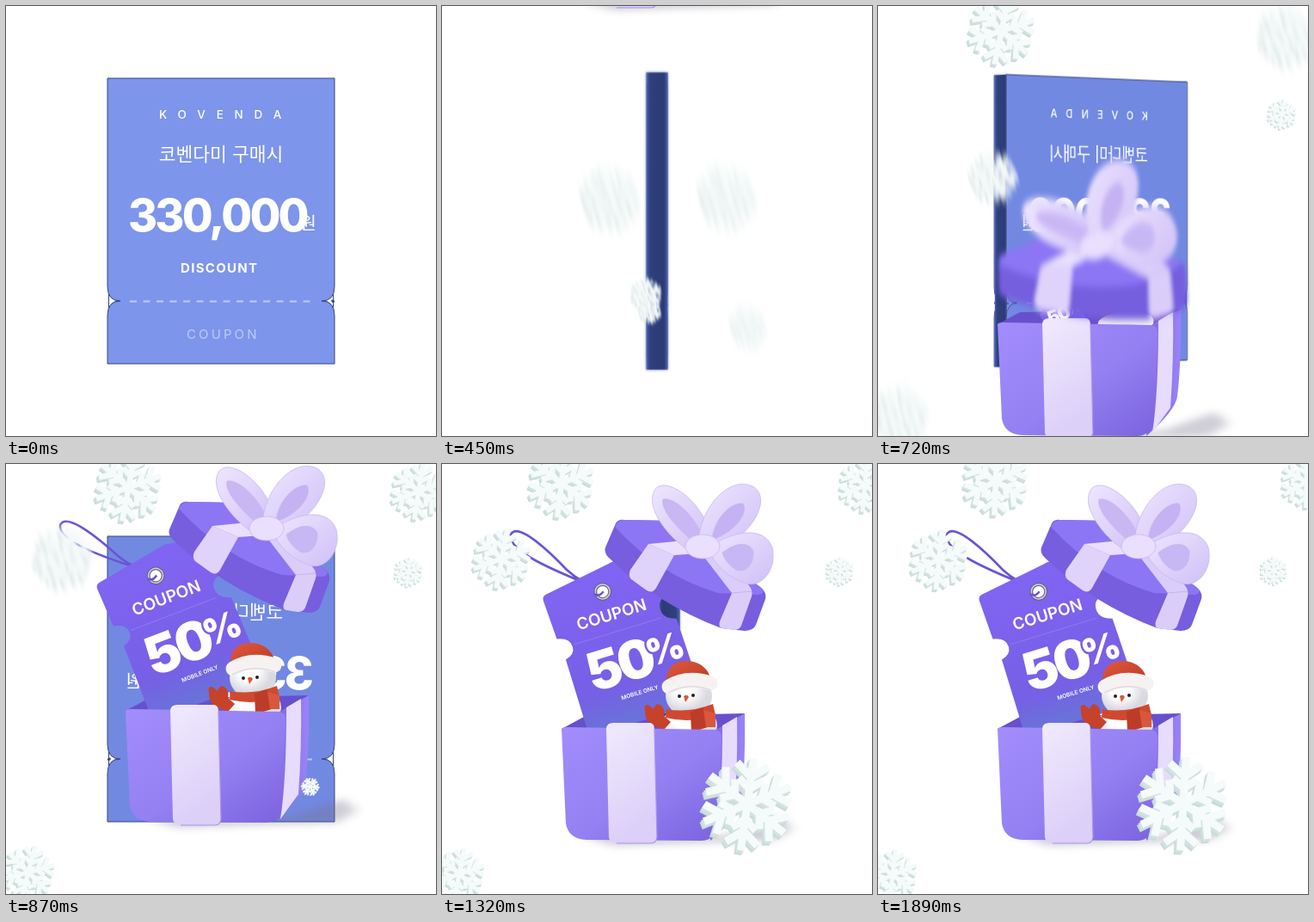
Animation, 500 px wide and 500 px high, one loop 1920 ms. Source, as an HTML page:

```html
<!DOCTYPE html>
<html lang="ko">
<head>
<meta charset="utf-8">
<title>Coupon gift box</title>
<style>
html, body { margin: 0; width: 100%; height: 100%; overflow: hidden; background: #fff; }
#stage { position: relative; width: 500px; height: 500px; overflow: hidden; perspective: 3000px; }
#scene { position: absolute; left: 0; top: 0; }
#card { position: absolute; left: 118px; top: 84px; width: 264px; height: 332px; transform-style: preserve-3d; }
#card > * { position: absolute; left: 0; top: 0; overflow: visible; }
#card .side { left: 120px; width: 24px; height: 332px; background: linear-gradient(90deg, #4c61ad, #2f407e 18%, #2c3b76 82%, #4c61ad); box-shadow: 0 0 3px #8796d8; }
text { font-family: Inter, "Open Sans", sans-serif; }
.ko { font-family: "Noto Sans CJK KR", "Noto Sans CJK", sans-serif; font-weight: 500; }
</style>
</head>
<body>
<div id="stage">
<div id="card"></div>
<svg id="scene" width="500" height="500" viewBox="0 0 500 500">
<defs>
  <linearGradient id="front" x2="1" y2="1">
    <stop stop-color="#a38dfd"/><stop offset=".55" stop-color="#9480f2"/><stop offset="1" stop-color="#7a62de"/>
  </linearGradient>
  <linearGradient id="flank" x2="1" y2="0">
    <stop stop-color="#7c65df"/><stop offset="1" stop-color="#9b83f8"/>
  </linearGradient>
  <linearGradient id="band" x2=".3" y2="1">
    <stop stop-color="#f0eafe"/><stop offset="1" stop-color="#dccff8"/>
  </linearGradient>
  <linearGradient id="loop" x2="1" y2="1">
    <stop stop-color="#eee6ff"/><stop offset="1" stop-color="#cfc0f7"/>
  </linearGradient>
  <linearGradient id="paper" x2="0" y2="1">
    <stop stop-color="#8065f2"/><stop offset=".75" stop-color="#775fe6"/><stop offset="1" stop-color="#6874d8"/>
  </linearGradient>
  <linearGradient id="hat" x2="1" y2="1">
    <stop stop-color="#e0593f"/><stop offset="1" stop-color="#b93822"/>
  </linearGradient>
  <radialGradient id="snow" cx=".4" cy=".35">
    <stop offset=".4" stop-color="#fff"/><stop offset="1" stop-color="#d9d9e0"/>
  </radialGradient>
  <filter id="soft" x="-50%" y="-100%" width="200%" height="300%"><feGaussianBlur stdDeviation="7 4"/></filter>
  <filter id="lidBlur" x="-20%" y="-20%" width="140%" height="140%"><feGaussianBlur stdDeviation="0"/></filter>
  <path id="arm" d="M0 0V-9.7M-3.3-8.3 0-5.6 3.3-8.3M-2.5-5.2 0-3.2 2.5-5.2" fill="none" stroke-width="1.6"/>
  <g id="arms"></g>
</defs>

<g id="box">
  <g id="boxBack">
    <path d="M160 432H330L392 410 408 424 385 438 200 444Z" fill="#777188" opacity=".35" filter="url(#soft)"/>
    <path d="M139 308 165 294 352 290 350 318 325 330H145Z" fill="#6750cd"/>
  </g>
  <g id="gifts">
    <g id="tag">
      <path d="M187 147C155 133 75 105 80 82 88 66 127 104 145 123 160 137 175 142 187 147" fill="none" stroke="#6b53d6" stroke-width="2.6"/>
      <g transform="translate(205 215) rotate(-17)">
        <path d="M-62-85 18-98Q24-100 30-98L66-92Q71-91 71-84V-43Q59-40 60-28 61-18 75-14L78 88H-62V-6Q-50-9-50-18-50-29-65-32L-67-79Q-67-84-62-85Z" fill="url(#paper)"/>
        <path d="M-48-20H58" stroke="#8e78f5"/>
        <circle cx="2" cy="-69" r="8.5" fill="#fff" stroke="#696685" stroke-width="4"/>
        <circle cx="2" cy="-69" r="8.5" fill="none" stroke="#d4d2df" stroke-width="1.5"/>
        <path d="M3-69Q-4-64-8-69" fill="none" stroke="#6b53d6" stroke-width="2.5"/>
        <g fill="#fff" text-anchor="middle">
          <text x="4" y="-34" font-size="19" font-weight="600">COUPON</text>
          <text x="-4" y="40" font-size="62" font-weight="900" letter-spacing="-4">50</text>
          <text x="52" y="31" font-size="43" font-weight="900" stroke="#7860e6" stroke-width="5" paint-order="stroke">%</text>
          <text x="9" y="58" font-size="6.6" font-weight="600">MOBILE ONLY</text>
        </g>
      </g>
    </g>
    <g id="snowman">
      <ellipse cx="288" cy="304" rx="32" ry="25" fill="url(#snow)"/>
      <ellipse cx="287" cy="270" rx="27" ry="23" fill="url(#snow)"/>
      <path d="M262 257C258 239 270 228 285 229 303 230 313 241 313 257Z" fill="url(#hat)"/>
      <path d="M264 259Q285 246 312 255" stroke="#f6f2f1" stroke-width="17" stroke-linecap="round" fill="none"/>
      <path d="M263 266Q287 253 313 263" stroke="#dfdbe0" stroke-width="1.5" fill="none"/>
      <circle cx="276" cy="270" r="2" fill="#252026"/><circle cx="292" cy="269" r="2" fill="#252026"/>
      <path d="M281 270Q285 267 287 271L283 277Z" fill="#dd5639"/>
      <path d="M261 285Q287 290 315 279L318 292Q290 302 260 295Z" fill="#cf4931"/>
      <path d="M289 288 304 283 309 306 290 312Z" fill="#bd3c27"/>
      <path d="M304 286 318 290V306H307Z" fill="#d9573d"/>
      <path d="M236 286Q234 279 240 280L246 285Q249 276 255 281 260 286 258 293L266 300 258 309 243 303Q235 295 236 286Z" fill="#c6422b"/>
    </g>
  </g>
  <g id="boxFront">
    <path d="M318 309 352 290Q353 350 348 392 346 408 312 438Z" fill="url(#flank)"/>
    <path d="M139 308Q140 306 146 306L318 309Q325 310 325 318L322 414Q320 437 302 438L168 437Q147 436 144 418Z" fill="url(#front)"/>
    <path d="M326 304 343 294Q344 350 340 405L319 434Q326 390 326 304Z" fill="#e6dcfd"/>
    <path d="M191 307Q192 301 199 301H242Q247 302 247 308L250 434Q249 441 243 441H203Q195 441 194 434Z" fill="url(#band)"/>
    <path d="M247 308 250 434Q249 441 243 441H203" fill="none" stroke="#a992eb" stroke-width="1.2"/>
  </g>
  <g filter="url(#lidBlur)"><g id="lid">
    <path d="M190 97 202 69Q205 64 212 65L265 66 370 143Q378 149 376 157L365 187Q362 194 352 194L325 191Q250 163 194 109Q188 103 190 97Z" fill="#765edf"/>
    <path d="M201 73Q205 64 213 65L265 66 370 143Q378 150 368 152L321 150Q253 130 201 73Z" fill="#8d76f4"/>
    <path d="M240 93 270 106 249 144Q245 151 238 147L220 134Q216 130 219 123Z" fill="#dfd3fb"/>
    <path d="M240 93 292 88 312 103 270 106Z" fill="#e9e0ff"/>
    <path d="M300 102 318 98 356 140Q362 147 360 154L348 188Q346 193 339 193L326 191Q321 190 323 183L337 150Z" fill="#dacdfa"/>
    <path d="M337 150 360 148" stroke="#c6b5f2"/>
    <g stroke="#c8b8f3" stroke-width=".8">
      <path d="M292 104C262 86 238 52 246 33 254 10 302 38 314 86Z" fill="url(#loop)"/>
      <path d="M294 92C270 72 254 52 257 41 269 38 291 57 303 83Z" fill="#c9b7f4"/>
      <path d="M298 96C298 49 337 11 363 27 384 42 359 86 316 102Z" fill="url(#loop)"/>
      <path d="M314 88C316 64 336 44 350 46 357 58 339 80 314 88Z" fill="#c4b2f2"/>
      <path d="M309 98C342 75 375 73 384 97 390 122 372 144 354 139 334 133 318 119 309 98Z" fill="url(#loop)"/>
      <path d="M326 103C342 91 356 90 362 101 363 117 353 127 342 123 334 118 328 111 326 103Z" fill="#c8b7f5"/>
      <ellipse cx="303" cy="96" rx="20" ry="14" fill="#e9dfff"/>
    </g>
  </g></g>
</g>
<g id="flakes"></g>
</svg>
</div>
<script>
const LOOP = 1920, STEP = 30;
const $ = id => document.getElementById(id);

const face = (fill, z) => `
<svg width="264" height="332" viewBox="118 84 264 332" style="transform:translateZ(${z}px)">
  <path d="M118 84H382V326Q382 343 367 343 382 343 382 360V416H118V360Q118 343 133 343 118 343 118 326Z" fill="${fill}" stroke="#384783"/>
  <path d="M144 343.5H358" stroke="#fff" stroke-opacity=".5" stroke-width="2" stroke-dasharray="8 7.5"/>
  <path d="M379 343.5H382" stroke="#2f3d75" stroke-width="2"/>
  <g fill="#fff">
    <text x="178" y="131" font-size="13.5" font-weight="500" letter-spacing="12.8">KOVENDA</text>
    <text class="ko" x="250" y="180" font-size="21.5" text-anchor="middle">코벤다미 구매시</text>
    <text x="142" y="262" font-size="52" font-weight="800" letter-spacing="-2.8">330,000</text>
    <text class="ko" x="342" y="260" font-size="20.5">원</text>
    <text x="203" y="309.5" font-size="15" font-weight="700" letter-spacing="1.3">DISCOUNT</text>
    <text x="210" y="386.5" font-size="15" letter-spacing="3.1" opacity=".5">COUPON</text>
  </g>
</svg>`;
const side = dir => `<div class="side" style="transform:rotateY(90deg) translateZ(${dir * 131}px)"></div>`;
$("card").innerHTML = face("#7d95ea", 12) + face("#7289e2", -12) + side(1) + side(-1);

for (let a = 0; a < 360; a += 60)
  $("arms").innerHTML += `<use href="#arm" transform="rotate(${a})"/>`;

const clamp = v => Math.max(0, Math.min(1, v));
const ramp = (t, from, to) => clamp((t - from) / (to - from));
const mix = (a, b, k) => a.map((v, i) => v + (b[i] - v) * k);

// Keys are [time, value] pairs, linearly blended.
function track(keys, t) {
  const i = keys.findIndex(key => key[0] >= t);
  if (i < 0) return keys[keys.length - 1][1];
  if (i === 0) return keys[0][1];
  const [a, b] = [keys[i - 1], keys[i]];
  return a[1] + (b[1] - a[1]) * ramp(t, a[0], b[0]);
}

const TURN = [[0, 0], [450, 90], [720, 143], [870, 180], [1110, 223], [1350, 270]];
const DROP = [[420, -530], [450, -439], [540, -120], [600, 45], [660, 78], [720, 62],
  [870, -21], [930, -20], [1110, 5], [1320, 0]];
const OPEN = [[690, 0], [720, .03], [840, .95], [870, 1]];

// Positions are [x, y, radius]; each flake bursts out through mid and settles at home.
const SOURCE = [250, 355, 4];
const flake = (born, pass, mid, land, home, drift, angle) => ({ born, pass, mid, land, home, drift, angle });
const FLAKES = [
  flake(330, 450, [197, 222, 36], 690, [144, 29, 41], [-7, -9, 0], 12),
  flake(330, 450, [333, 220, 35], 720, [476, 34, 35], [22, -13, -4], 10),
  flake(360, 450, [357, 372, 22], 690, [470, 126, 18], [-10, -2, -1], 8),
  flake(390, 450, [238, 335, 19], 870, [67, 108, 36], [4, 3, 0], 14),
  flake(420, 450, [242, 355, 14], 720, [28, 474, 33], [-11, 4, -2], 16),
  flake(840, 870, [354, 375, 11], 1080, [355, 396, 56], [0, -1, 0], 10)
];
const layer = (y, color) => `<g transform="translate(${-y * .7} ${y})"><use href="#arms" stroke="${color}"/></g>`;
$("flakes").innerHTML = FLAKES.map((_, i) => `
  <filter id="b${i}" x="-50%" y="-60%" width="200%" height="220%"><feGaussianBlur stdDeviation="0"/></filter>
  <g class="flake"><g><g>${layer(.9, "#c9dcd9")}${layer(.5, "#d2e2df")}${layer(0, "#f5fafa")}</g></g></g>`).join("");
const nodes = [...document.querySelectorAll(".flake")];

const place = (node, value) => node.setAttribute("transform", value);
const setBlur = (id, x, y) => $(id).firstElementChild.setAttribute("stdDeviation", `${x} ${y}`);

function flakeAt(f, t) {
  const from = f.born > 800 ? f.mid : SOURCE;
  if (t < f.pass) return mix(from, f.mid, ramp(t, f.born, f.pass));
  const flown = mix(f.mid, f.home, ramp(t, f.pass, f.land) ** 1.15);
  return flown.map((v, i) => v + f.drift[i] * ramp(t, f.land, 1560));
}

function drawFlake(node, i, t) {
  const f = FLAKES[i], [x, y, r] = flakeAt(f, t), [px, py] = flakeAt(f, t - STEP);
  const speed = Math.hypot(x - px, y - py);
  const blur = speed > 6 ? speed * .24 : 0;
  const angle = f.angle - (t - f.land) * (t < f.land ? .12 : .008);
  const inner = node.firstElementChild, shape = inner.firstElementChild;
  node.style.display = t < f.born ? "none" : "";
  place(node, `translate(${x} ${y}) rotate(-12)`);
  place(shape, `rotate(12) scale(${r / 10})`);
  shape.querySelectorAll("use").forEach(u => place(u, `rotate(${angle})`));
  setBlur("b" + i, blur * .15, blur);
  if (blur) inner.setAttribute("filter", `url(#b${i})`);
  else inner.removeAttribute("filter");
}

function draw(t) {
  $("card").style.transform = `translateZ(-12px) rotateY(${-track(TURN, t)}deg)`;
  $("card").style.visibility = t >= 1380 ? "hidden" : "visible";

  $("box").style.display = t < 420 ? "none" : "";
  place($("box"), `translate(0 ${track(DROP, t)})`);
  const shut = 1 - track(OPEN, t);
  place($("lid"), `translate(${285 - 36 * shut} ${125 + 132 * shut}) rotate(${-25 * shut}) scale(${1 + .12 * shut}) translate(-285 -125)`);
  const blur = 4 * ramp(t, 690, 720) * (1 - ramp(t, 780, 870));
  setBlur("lidBlur", blur * .5, blur);

  const rise = .2 + .8 * ramp(t, 690, 855);
  const tilt = -4 * (1 - ramp(t, 870, 1110));
  $("gifts").style.display = t < 690 ? "none" : "";
  place($("tag"), `translate(215 330) rotate(${tilt}) scale(${rise}) translate(-215 -330)`);
  place($("snowman"), `translate(0 ${(1 - rise) * 76})`);
  nodes.forEach((node, i) => drawFlake(node, i, t));
}

const start = performance.now();
function frame() {
  const t = (performance.now() - start) % LOOP;
  draw(Math.floor(t / STEP) * STEP);
  requestAnimationFrame(frame);
}
frame();
</script>
</body>
</html>
```
